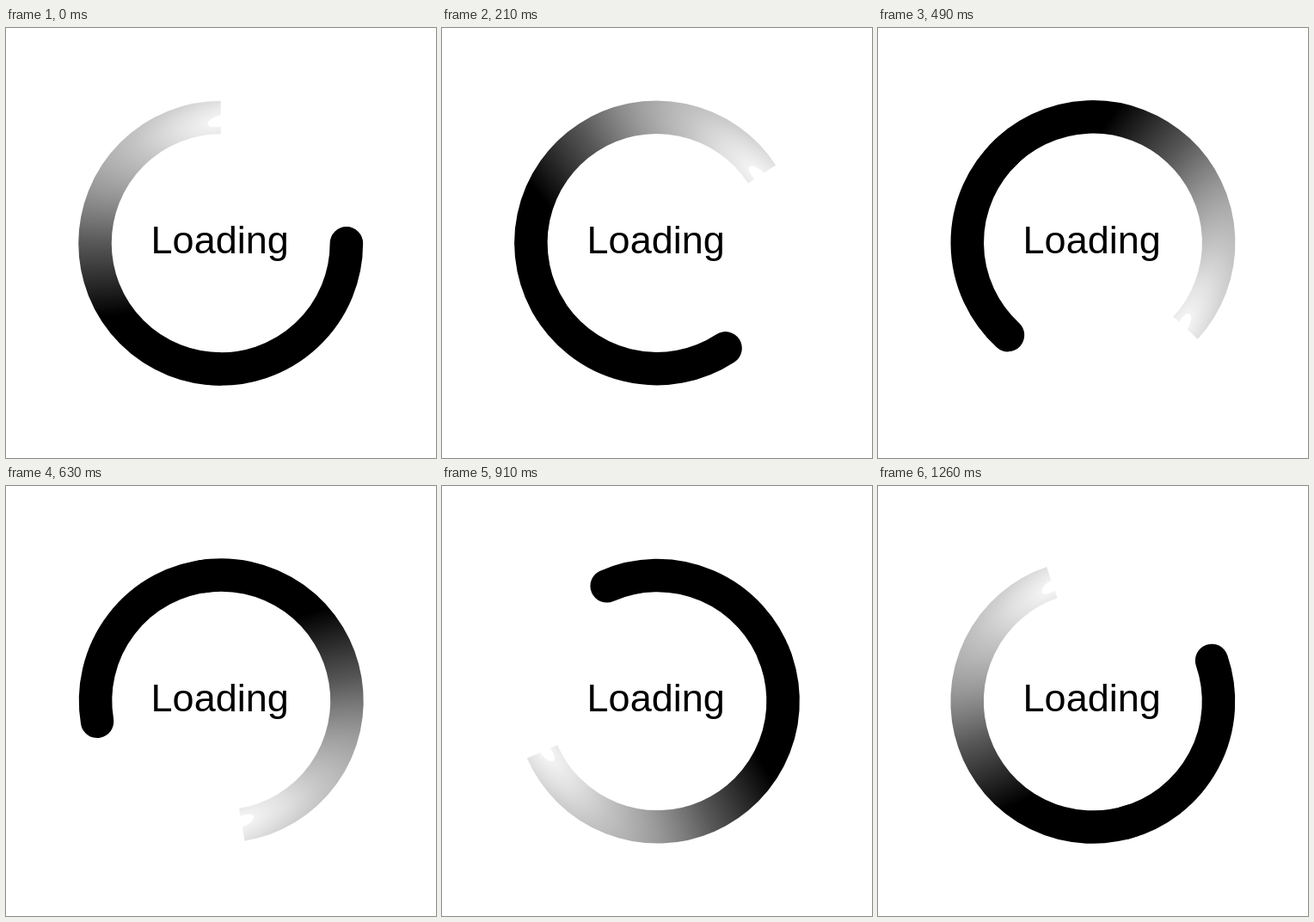
These frames come from a looping animation (500x500 px, 1330 ms). An HTML page:

```html
<!DOCTYPE html>
<html lang="en">
<head>
<meta charset="utf-8">
<title>Loading</title>
<style>
  html, body { margin: 0; width: 100%; height: 100%; overflow: hidden; background: #fff; }
  svg { display: block; width: 100vw; height: 100vh; }
  path { fill: none; stroke-width: 38.5; }
  text { font: 45px "Liberation Sans", Helvetica, Arial, sans-serif; }
</style>
</head>
<body>
<svg viewBox="0 0 500 500">
  <defs>
    <!-- Flat, tilted ellipses of light around the tail -->
    <radialGradient id="fade" gradientUnits="userSpaceOnUse" cx="0" cy="0" r="200"
      gradientTransform="translate(250 107.5) rotate(-15) scale(2.5 1)">
      <stop offset=".03" stop-color="#fff"/>
      <stop offset=".032" stop-color="#f2f2f2"/>
      <stop offset=".11" stop-color="#e0e0e0"/>
      <stop offset=".205" stop-color="#c4c4c4"/>
      <stop offset=".38" stop-color="#989898"/>
      <stop offset=".61" stop-color="#585858"/>
      <stop offset="1" stop-color="#000"/>
    </radialGradient>
  </defs>
  <g id="ring">
    <!-- The ring sits slightly off its pivot -->
    <g transform="translate(-.3 .3)">
      <path d="M396.2 250A146.2 146.2 0 0 1 240 395.86" stroke="#000" stroke-linecap="round"/>
      <path d="M250 396.2A146.2 146.2 0 0 1 250 103.8" stroke="url(#fade)"/>
    </g>
  </g>
  <text x="168.6" y="262">Loading</text>
</svg>
<script>
  const STEPS = 19, STEP_MS = 70;
  const ring = document.getElementById("ring");

  function draw(now) {
    const step = Math.floor(now / STEP_MS) % STEPS;
    ring.setAttribute("transform", `rotate(${step * 360 / STEPS} 250 250)`);
    requestAnimationFrame(draw);
  }
  draw(performance.now());
</script>
</body>
</html>
```
